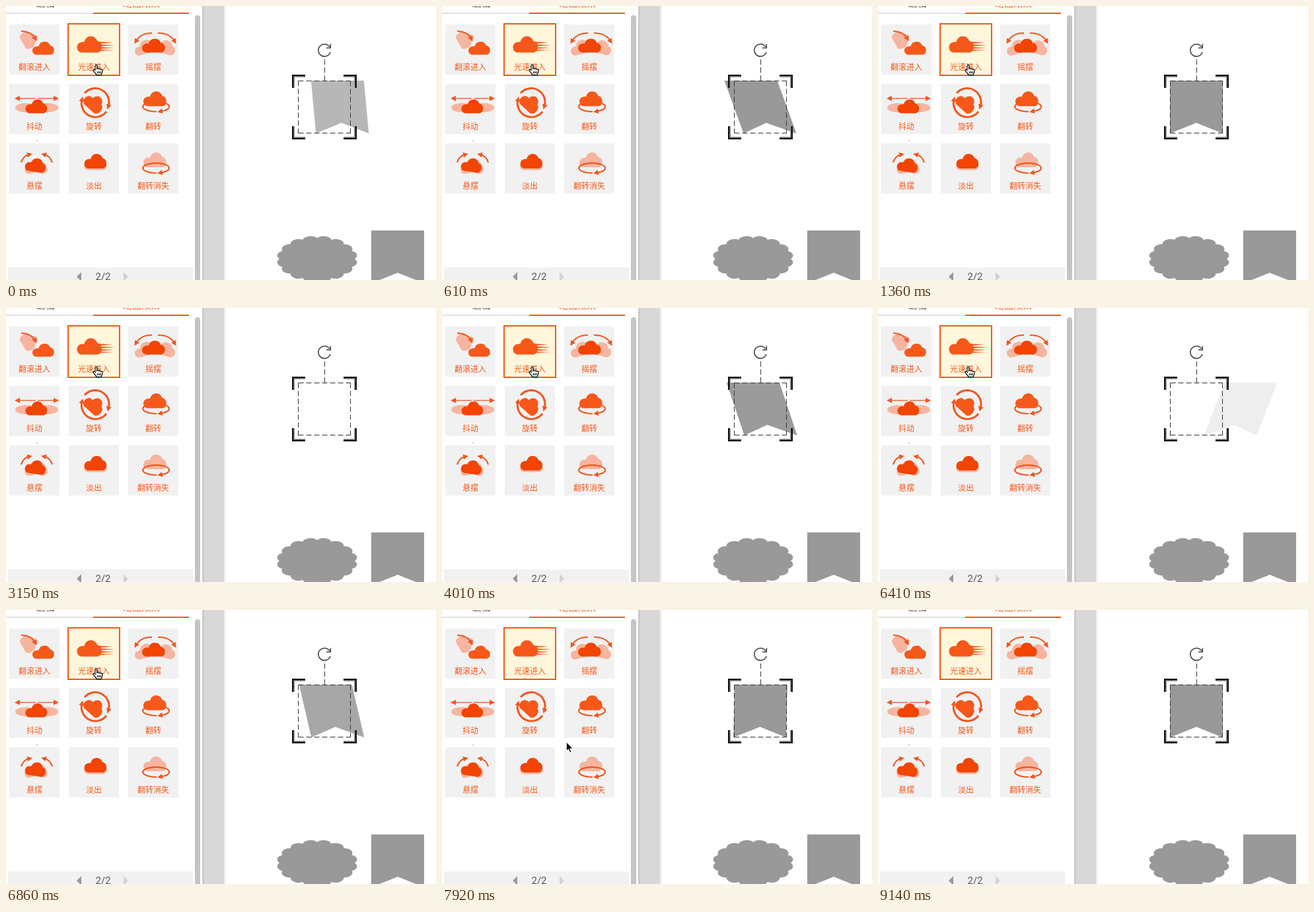
An HTML page for the animation above (9.97 s loop, 651 by 415 pixels).

```html
<!DOCTYPE html>
<html lang="zh">
<head>
<meta charset="utf-8">
<style>
html, body { margin: 0; width: 100%; height: 100%; overflow: hidden; background: #fff; }
svg { display: block; }
text { font-family: "Noto Sans CJK SC", "Noto Sans CJK", sans-serif; text-anchor: middle; }
.label { font-size: 12px; fill: #f4581a; }
.pale { fill: #f5b5a0; }
.deep { fill: #f24403; }
.arc { fill: none; stroke: #f0561e; stroke-width: 2.2; marker-end: url(#head); }
.thin { stroke-width: 1.3; }
.thick { stroke-width: 3; }
</style>
</head>
<body>
<svg width="651" height="415" viewBox="0 0 651 415">
  <defs>
    <path id="cloud" d="M-12 12A7 7 0 0 1-12-2Q-10.5-2.8-8.5-2A10.2 10.2 0 0 1 11-3.5A8 8 0 0 1 12 12Z"/>
    <path id="flag" d="M-40-40H40V40L0 24L-40 40Z"/>
    <g id="bracket" fill="none">
      <path d="M3.3 20V3.3H20" stroke="#999" stroke-width="1.6"/>
      <path d="M1.3 20V1.3H20" stroke="#111" stroke-width="2.6"/>
    </g>
    <path id="ring" class="arc" d="M2 7A20 7.5 0 1 1 12 5.8L8 6.6"/>
    <marker id="head" markerUnits="userSpaceOnUse" markerWidth="9" markerHeight="8" refX="3" refY="4" orient="auto">
      <path d="M0 0L8 4L0 8Z" fill="#f0561e"/>
    </marker>
  </defs>

  <!-- panels -->
  <path d="M297 0H331V415H297Z" fill="#d8d8d8"/>
  <path d="M297 0H300V415H297Z" fill="#cbcbcb"/>
  <path d="M330 0H333V415H330Z" fill="#f0f0f0"/>
  <text x="59.5" y="1" font-size="14" fill="#555">编辑</text>
  <text x="205" y="1" font-size="14" fill="#f4581a">动画效果</text>
  <path d="M0 10H132V12H0Z" fill="#e2e2e2"/>
  <path d="M132 10H277V12H132Z" fill="#f4581a"/>
  <g id="cells"></g>

  <!-- effect icons -->
  <g fill="#f6581a">
    <use class="pale" href="#cloud" transform="translate(37 50) rotate(60) scale(.72 1.1)"/>
    <use href="#cloud" transform="translate(57 63) scale(.9)"/>
    <path class="arc" d="M23 38Q39 39 44 49"/>

    <use href="#cloud" transform="translate(127 57) scale(1.03 1.12)"/>
    <path d="M140 54L161 55.5L140 57ZM140 58L165 59.5L140 61ZM140 62L163 63.5L140 65ZM140 66L165 67L140 68Z"/>

    <use class="pale" href="#cloud" transform="translate(211 61) rotate(-15) scale(.93)"/>
    <use class="pale" href="#cloud" transform="translate(241 61) rotate(15) scale(.93)"/>
    <use class="deep" href="#cloud" transform="translate(224 59) scale(.95)"/>
    <path class="arc" d="M221 41Q204 41 197 53"/>
    <path class="arc" d="M230 41Q248 41 255 53"/>

    <ellipse class="pale" cx="30" cy="154" rx="16" ry="7"/>
    <ellipse class="pale" cx="63" cy="154" rx="16" ry="7"/>
    <use class="deep" href="#cloud" transform="translate(46.5 151) scale(.9 .95)"/>
    <path class="arc thin" d="M45 140H18"/>
    <path class="arc thin" d="M48 140H75"/>

    <use href="#cloud" transform="translate(135 146) rotate(42) scale(.85 1.1)"/>
    <path class="arc thick" d="M119 132A21 21 0 0 1 155 152"/>
    <path class="arc thick" d="M152 160A21 21 0 0 1 115 142"/>

    <use href="#ring" x="226" y="153"/>
    <use href="#cloud" transform="translate(226 139.5) scale(.95 1.03)"/>

    <use class="pale" href="#cloud" transform="translate(44 241) rotate(-14) scale(.9)"/>
    <use class="pale" href="#cloud" transform="translate(48 241) rotate(14) scale(.9)"/>
    <use class="deep" href="#cloud" transform="translate(45.5 240) rotate(8) scale(.86 .95)"/>
    <path class="arc" d="M23 237Q26 227 35 225"/>
    <path class="arc" d="M70 237Q67 227 58 225"/>

    <use class="pale" href="#cloud" transform="translate(136 239) scale(.94 .8)"/>
    <use class="deep" href="#cloud" transform="translate(136 234) scale(.92 1)"/>

    <use class="pale" href="#cloud" transform="translate(226 232) scale(.95 1.03)"/>
    <use href="#ring" x="226" y="246"/>
  </g>
  <path d="M46 204H48V205H46Z" fill="#aaa"/>

  <!-- pager and scrollbar -->
  <path d="M3 396H283V415H3Z" fill="#f1f1f1"/>
  <path d="M114 403V417L107 410Z" fill="#999"/>
  <path d="M178 403V417L185 410Z" fill="#d2d2d2"/>
  <text x="147" y="415" font-size="15" fill="#555" style="font-family:Roboto,sans-serif">2/2</text>
  <rect id="bar" x="286" y="14" width="8" height="420" rx="4" fill="#c4c4c4"/>

  <!-- canvas -->
  <path id="badge" fill="#999"/>
  <use href="#flag" x="593" y="380" fill="#999"/>
  <use id="shape" href="#flag" fill="#999"/>
  <g fill="none" stroke="#333">
    <path d="M482.5 81V113M442.5 113.5H522M442.5 192.5H522M442.5 113.5V193M521.5 113.5V193" stroke-dasharray="8 4"/>
    <path d="M490 62A9.3 9.3 0 1 0 491 70M491.3 57.5V63.5H485" stroke="#444" stroke-width="1.6"/>
  </g>
  <use href="#bracket" transform="translate(433 104)"/>
  <use href="#bracket" transform="translate(531 104) scale(-1 1)"/>
  <use href="#bracket" transform="translate(433 202) scale(1 -1)"/>
  <use href="#bracket" transform="translate(531 202) scale(-1 -1)"/>

  <g id="cursor">
    <path id="hand" fill="#fff" stroke="#111" stroke-width="1.3" d="M4 9V2.2C4 .3 6.8 .3 6.8 2.2V7C7.4 6 9.4 6.2 9.6 7.3C10.4 6.4 12 6.8 12.2 8C13 7.2 14.8 7.6 14.8 9.3V11.5C14.8 13 13.6 14 13.2 16.5H6C5.5 14.5 2.5 12 1 9.6C.6 8 2.6 7.4 4 9ZM7.5 11V14M9.8 11V14M12 11V14"/>
    <path id="arrow" fill="#111" stroke="#fff" d="M.5 .5V14.5L3.7 11.5L6 16.8L8.4 15.8L6.1 10.6H10.5Z"/>
  </g>
</svg>
<script>
const LOOP = 9970, STEP = 60;
const $ = id => document.getElementById(id);
const clamp = x => Math.max(0, Math.min(1, x));
const mix = (a, b, p) => a + (b - a) * p;

const labels = ['翻滚进入', '光速进入', '摇摆', '抖动', '旋转', '翻转', '悬摆', '淡出', '翻转消失'];
$('cells').innerHTML = labels.map((label, i) => {
  const x = 5 + i % 3 * 90, y = 28 + Math.floor(i / 3) * 90;
  const box = i === 1
    ? `<rect x="${x - 1}" y="${y - 1}" width="78" height="78" fill="#fff7dc" stroke="#f4581a" stroke-width="2"/>`
    : `<rect x="${x}" y="${y}" width="76" height="76" fill="#f1f1f1"/>`;
  return `${box}<text class="label" x="${x + 38}" y="${y + 69}">${label}</text>`;
}).join('');

// scalloped ellipse
const BUMPS = 16;
let scallops = '';
for (let i = 0; i <= BUMPS; i++) {
  const a = (i / BUMPS - .25) * 2 * Math.PI;
  const point = `${471 + 57 * Math.cos(a)} ${383 + 31.5 * Math.sin(a)}`;
  scallops += i ? `A12.5 7.5 0 0 1 ${point}` : `M${point}`;
}
$('badge').setAttribute('d', scallops + 'Z');

// cubic-bezier(.25, .1, .25, 1)
function ease(x) {
  let lo = 0, hi = 1, s = x;
  for (let i = 0; i < 24; i++) {
    s = (lo + hi) / 2;
    if (.75 * s * (1 - s) + s ** 3 < x) lo = s; else hi = s;
  }
  return .3 * s * (1 - s) ** 2 + 3 * s * s * (1 - s) + s ** 3;
}

// shown from, step anchor, start, duration
const runs = [[0, 0, -454, 1815], [3150, 4010, 3135, 1865], [6230, 6860, 6224, 1865]];

function drawShape(t) {
  const [, anchor, start, span] = runs.filter(r => r[0] <= t).pop();
  const held = anchor + Math.floor((t - anchor) / STEP) * STEP;
  const k = clamp((held - start) / span);
  let dx = 0, skew, alpha = 1;
  if (k < .6) {
    alpha = ease(k / .6);
    dx = 80 * (1 - alpha);
    skew = mix(-30, 20, alpha);
  } else if (k < .8) skew = mix(20, -5, ease((k - .6) / .2));
  else skew = mix(-5, 0, ease((k - .8) / .2));
  $('shape').setAttribute('transform', `translate(${482 + dx} 153) skewX(${skew})`);
  $('shape').setAttribute('opacity', alpha);
}

// time, x, y
const path = [[0, 131, 88], [7700, 131, 88], [8210, 262, 345], [8420, 262, 345], [8670, 296, 418],
  [8899, 630, 418], [8900, 630, 405], [9079, 630, 405], [9080, 631, 409], [9139, 631, 409], [9140, 631, 430], [LOOP, 631, 430]];

function drawCursor(t) {
  const i = path.findIndex(p => p[0] > t);
  const [t0, x0, y0] = path[i - 1], [t1, x1, y1] = path[i];
  const p = (t - t0) / (t1 - t0), y = mix(y0, y1, p);
  $('cursor').setAttribute('transform', `translate(${mix(x0, x1, p)} ${y})`);
  $('hand').style.display = y < 106 ? '' : 'none';
  $('arrow').style.display = y < 106 ? 'none' : '';
}

function frame(now) {
  const t = now % LOOP;
  drawShape(t);
  drawCursor(t);
  $('bar').setAttribute('opacity', 1 - clamp((t - 8420) / 250));
  requestAnimationFrame(frame);
}
frame(0);
</script>
</body>
</html>
```
